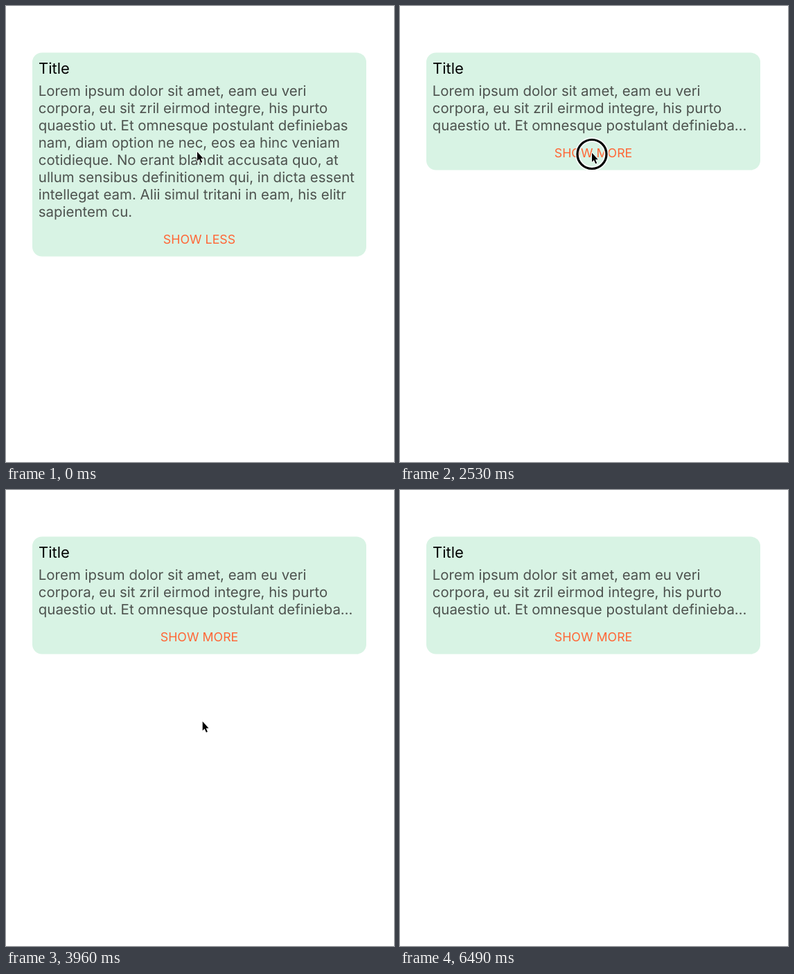
Recreate the animation shown at these times as an HTML page. Size 560 by 660 pixels, loop 6.6 s.

```html
<!DOCTYPE html>
<html lang="en">
<head>
<meta charset="utf-8">
<title>Expandable card</title>
<style>
  html, body { margin: 0; width: 100%; height: 100%; overflow: hidden; background: #fff; }
  svg { display: block; width: 560px; height: 660px; }
  text { font-family: Inter, Roboto, sans-serif; font-optical-sizing: none; text-rendering: geometricPrecision; }
  .title { font-size: 22px; fill: #000; }
  .body { font-size: 20.45px; fill: #4d524e; }
  .button { font-size: 17.8px; fill: #ff6636; text-anchor: middle; }
</style>
</head>
<body>
<svg viewBox="0 0 560 660">
  <rect id="card" x="38" y="67.5" width="482" rx="14" fill="#d8f3e4"/>
  <text class="title" x="47" y="98">Title</text>
  <g id="body" class="body"></g>
  <text id="button" class="button" x="279"></text>
  <g id="pointer">
    <g id="ring" fill="none">
      <circle cy="2" r="21" stroke="#fff" stroke-opacity=".7" stroke-width="7"/>
      <circle cy="2" r="21" stroke="#000" stroke-width="3.2"/>
    </g>
    <path d="M0 0V13.2L2.9 10.5L5.2 15.8L7.2 15L5 9.8H8.8Z"
          fill="#000" stroke="#fff" stroke-width="1.6" stroke-linejoin="round" paint-order="stroke"/>
  </g>
</svg>
<script>
  const LOOP = 6600, STEP = 110;
  const $ = id => document.getElementById(id);

  const lines = [
    'Lorem ipsum dolor sit amet, eam eu veri',
    'corpora, eu sit zril eirmod integre, his purto',
    'quaestio ut. Et omnesque postulant definiebas',
    'nam, diam option ne nec, eos ea hinc veniam',
    'cotidieque. No erant blandit accusata quo, at',
    'ullum sensibus definitionem qui, in dicta essent',
    'intellegat eam. Alii simul tritani in eam, his elitr',
    'sapientem cu.'
  ];
  const shortLines = [...lines.slice(0, 2), lines[2].replace(/s$/, '…')];

  // Pointer tip: [time, x, y]
  const path = [
    [0, 276, 211], [110, 276, 211], [770, 283, 333.5], [1365, 283, 333.5],
    [2200, 277, 212.5], [2700, 277, 212.5], [3150, 285, 330], [3200, 285, 330],
    [3450, 283.7, 335], [LOOP, 283.7, 335]
  ];
  const presses = [[1100, 1320], [2420, 2640], [3740, 3960]];
  const hideAt = 5830;

  const ease = p => p * p * (3 - 2 * p);

  function tipAt(t) {
    const i = path.findIndex(k => k[0] > t);
    const [t0, x0, y0] = path[i - 1], [t1, x1, y1] = path[i];
    const p = ease((t - t0) / (t1 - t0));
    return [x0 + (x1 - x0) * p, y0 + (y1 - y0) * p];
  }

  function setCard(open) {
    const rows = open ? lines : shortLines;
    const top = open ? 130.3 : 129.5;
    $('card').setAttribute('height', open ? 295 : 170);
    $('body').innerHTML = rows
      .map((row, i) => `<text x="46.8" y="${top + i * 25}">${row}</text>`).join('');
    $('button').textContent = open ? 'SHOW LESS' : 'SHOW MORE';
    $('button').setAttribute('y', open ? 343.5 : 218.5);
  }

  const show = (id, on) => $(id).setAttribute('visibility', on ? 'inherit' : 'hidden');
  let wasOpen;

  function draw() {
    const t = Math.floor(performance.now() % LOOP / STEP) * STEP;
    // Each released press toggles the card
    const open = presses.filter(p => t >= p[1]).length % 2 === 0;
    if (open !== wasOpen) setCard(wasOpen = open);
    $('pointer').setAttribute('transform', `translate(${tipAt(t)})`);
    show('pointer', t < hideAt);
    show('ring', presses.some(([down, up]) => t >= down && t < up));
    requestAnimationFrame(draw);
  }
  draw();
</script>
</body>
</html>
```
